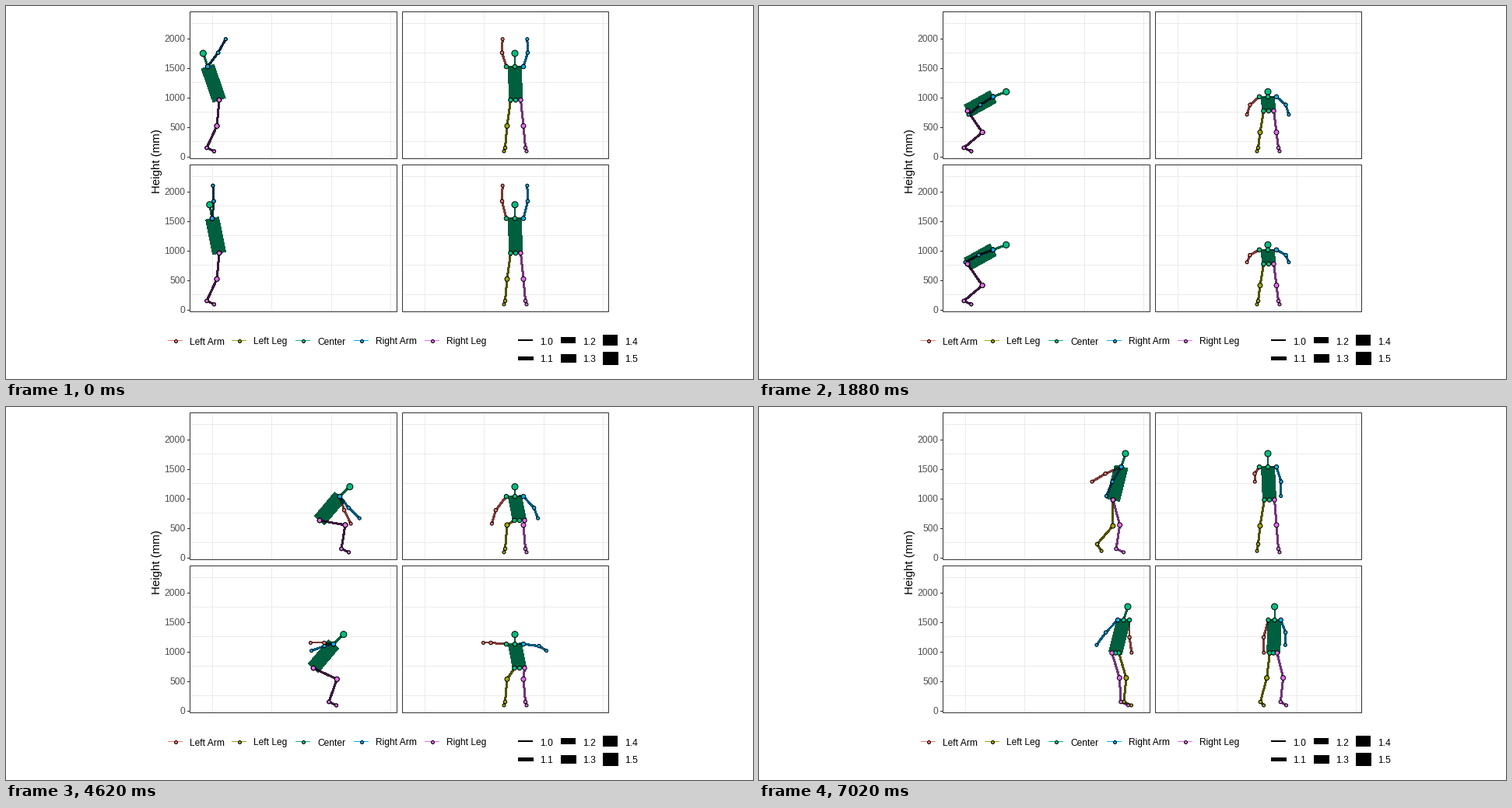
Animation, 960 px wide and 480 px high, one loop 7.04 s. Source, as a matplotlib script:

```python
import numpy as np
import matplotlib.pyplot as plt
from matplotlib.animation import FuncAnimation
from matplotlib.collections import LineCollection
from matplotlib.patches import Rectangle

W, H, STEP, FRAMES = 960, 480, 20, 352
PT = 0.72  # points per pixel at 100 dpi
RED, OLIVE, GREEN, BLUE, PINK = "#F8766D", "#A3A500", "#00BF7D", "#00B0F6", "#E76BF3"
THIGH, SHANK, FOOT, GROUND = 33.5, 31, 10.5, 182.5

plt.rcParams["font.family"] = "Liberation Sans"

# Motion clock: pauses on landing, then runs on
now = np.arange(FRAMES) * STEP
LAND, PAUSE = 3620, 660
clock = np.where(now < LAND, now, np.maximum(now - PAUSE, LAND))


def curve(t, *keys):
    """Monotone cubic through (time, value) keys, flat outside them."""
    ts, vs = np.array(keys, float).T
    h, d = np.diff(ts), np.diff(vs) / np.diff(ts)
    m = np.zeros_like(vs)
    same = d[:-1] * d[1:] > 0
    m[1:-1] = np.where(same, 2 * d[:-1] * d[1:] / np.where(same, d[:-1] + d[1:], 1), 0)
    t = np.clip(t, ts[0], ts[-1])
    i = np.clip(np.searchsorted(ts, t, "right") - 1, 0, len(h) - 1)
    u = (t - ts[i]) / h[i]
    return (vs[i] * (1 + 2 * u) * (1 - u) ** 2 + vs[i + 1] * u * u * (3 - 2 * u)
            + h[i] * u * (1 - u) * (m[i] * (1 - u) - m[i + 1] * u))


def polar(r, deg):
    a = np.radians(deg)
    return r * np.cos(a), r * np.sin(a)


def bend_knee(hx, hy, ax_, ay):
    """Place the knee in front of the line from hip to ankle."""
    dx, dy = ax_ - hx, ay - hy
    d = np.hypot(dx, dy)
    along = (THIGH**2 - SHANK**2 + d * d) / (2 * d)
    out = np.sqrt(np.maximum(THIGH**2 - along**2, 0))
    return hx + (along * dx + out * dy) / d, hy + (along * dy - out * dx) / d


def jumper(drop, stop, pace, sway, arms, twist, wide, low, land, steps, turn):
    """Side and front joint paths of one athlete doing a standing long jump.

    Joints: head, shoulder/elbow/wrist left then right,
    hip/knee/ankle/toe left then right, neck, pelvis.
    """
    t = np.minimum(clock, stop)
    rise = np.where(t < 4340, t, 4340 + pace * (t - 4340))

    hip_x = curve(t, (0, 274), (680, 274 - 16.5 * sway), (1450, 259), (1880, 268),
                  (2180, 291), (2560, 323), (2800, 351), (LAND, 397),
                  (3960, 403 + (land - 431) / 2), (4740, 418), (5280, 441), (5760, 455),
                  (6360, 458))
    hip_y = curve(rise, (0, 121), (680, 120), (1880, 135), (2180, 127), (2800, 100),
                  (LAND, low), (3960, low), (4740, 143), (5280, 121.5), (5760, 119.5))
    lean = curve(rise, (0, -19 * sway), (680, 22 * sway), (1880, 61), (2560, 16),
                 (2800, -2), (LAND, 12), (3960, 40), (4740, 42), (5280, 31), (5760, 14))
    dx, dy = polar(45.5 - 0.13 * np.maximum(lean, 0), lean - 90)
    neck_x, neck_y = hip_x + dx, hip_y + dy
    dx, dy = polar(18, 1.1 * lean - 88)
    head_x, head_y = neck_x + dx, neck_y + dy

    arm_times = [0, 680, 1450, 1880, 2180, 2560, 2800, 3250, LAND, 3960, 5280, stop]
    arm = curve(t, *zip(arm_times, arms))
    cross = curve(t, (LAND, 0), (3960, 10), (5280, twist[0]), (stop, twist[1]))
    out = curve(t, (0, 5.5), (680, 9), (1880, 12), (2800, 1), (LAND, wide),
                (3960, 0.8 * wide), (5280, 8), (5760, 6))
    out2 = 0.7 * out - 4.5
    upper = np.sqrt(np.maximum(23**2 - out**2, 12**2))
    fore = np.sqrt(20**2 - out2**2)

    yaw = np.radians(curve(t, (5280, 0), (6360, turn)))
    shift = curve(t, (4340, 0), (5280, turn / 8), (6360, turn / 5))
    hip_mid = 655 + 0.6 * shift + curve(t, (1880, 0), (3960, 5), (5280, 1))
    neck_mid = 654 + shift

    foot_x = curve(t, (0, 258), (680, 262), (2250, 264), (2560, 281), (2800, 306),
                   (3250, 370), (LAND, land))
    lift = curve(t, (2250, 0), (2560, 21), (2800, 44), (3250, 32), (LAND, 0))

    limbs, legs = [], []
    for sign, (start, end, reach, height) in zip((-1, 1), steps):
        sx, sf = neck_x - sign * 11 * np.sin(yaw), neck_mid + sign * 11 * np.cos(yaw)
        ex, ey = polar(upper, arm - sign * cross)
        wx, wy = polar(fore, arm - sign * cross - 8)
        limbs += [(sx, sf, neck_y), (sx + ex, sf + sign * out, neck_y + ey),
                  (sx + ex + wx, sf + sign * (out + out2), neck_y + ey + wy)]

        u = np.clip((t - start) / (end - start), 0, 1)
        up = lift + height * np.sin(np.pi * u)
        hx, hf = hip_x - sign * 6.5 * np.sin(yaw), hip_mid + sign * 6.5 * np.cos(yaw)
        fx, fy = foot_x + reach * u * u * (3 - 2 * u), GROUND - up
        kx, ky = bend_knee(hx, hip_y, fx, fy)
        tx, ty = polar(FOOT, 25 + 85 * np.tanh(up / 15))
        legs += [(hx, hf, hip_y), (kx, 654.5 + shift + sign * 10.5, ky),
                 (fx, 654.5 + shift / 3 + sign * 13, fy),
                 (fx + tx, 654.5 + shift + sign * 14.5, fy + ty)]

    joints = [(head_x, neck_mid, head_y), *limbs, *legs,
              (neck_x, neck_mid, neck_y), (hip_x, hip_mid, hip_y)]
    side, front, y = np.array(joints).transpose(1, 2, 0)
    y = y + drop
    return [np.stack([side, y], -1), np.stack([front, y], -1)]


views = jumper(
    drop=0, stop=5760, pace=1, sway=1, twist=(5, 18), wide=17, low=146, land=431,
    arms=[-53, 17, 150, 148, 78, -58, -24, 27, 39, 62, 153, 139],
    steps=[(5580, 6340, 25, 9), (4640, 5760, 28, 4)], turn=0)
views += jumper(
    drop=197, stop=6360, pace=0.7, sway=0.6, twist=(26, -22), wide=25, low=139, land=415,
    arms=[-85, -28, 145, 160, 80, -60, -60, 24, 150, 178, 138, 112],
    steps=[(4840, 5840, 54, 9), (4440, 5240, 50, 5)], turn=43)

# (joint, joint, colour, width), back to front
BONES = [(1, 2, RED, 2), (2, 3, RED, 2)]
BONES += [(i, i + 1, OLIVE, 2) for i in (7, 8, 9)]
BONES += [(15, 16, GREEN, 17), (0, 15, GREEN, 2), (1, 4, GREEN, 2), (7, 11, GREEN, 2)]
BONES += [(4, 5, BLUE, 2), (5, 6, BLUE, 2)]
BONES += [(i, i + 1, PINK, 2) for i in (11, 12, 13)]
ENDS = np.array([b[:2] for b in BONES])

# (joint, colour, diameter), back to front
DOTS = [(2, RED, 4.5), (3, RED, 4), (8, OLIVE, 6), (9, OLIVE, 4.5), (10, OLIVE, 4),
        (0, GREEN, 8)] + [(i, GREEN, 5.5) for i in (1, 7, 15, 16)]
DOTS += [(4, BLUE, 5.5), (5, BLUE, 4.5), (6, BLUE, 4),
         (11, PINK, 5.5), (12, PINK, 6), (13, PINK, 4.5), (14, PINK, 4)]
SPOTS = [d[0] for d in DOTS]

fig = plt.figure(figsize=(W / 100, H / 100), dpi=100, facecolor="white")
ax = fig.add_axes([0, 0, 1, 1])
ax.set_xlim(0, W)
ax.set_ylim(H, 0)
ax.axis("off")


def line(xs, ys, color, width=1):
    ax.plot(xs, ys, color=color, lw=width * PT, solid_capstyle="butt",
            antialiased=False, zorder=1)


def label(x, y, s, px=12, color="black", **kw):
    ax.text(x, y, s, fontsize=px * PT, color=color, **kw)


for top in (8, 205):
    for left, right, x0 in ((237, 502, 265), (510, 774, 538)):
        for k in range(4):
            line([x0 + round(76.4 * k)] * 2, [top, top + 188], "#EBEBEB")
        for k in range(5):
            line([left, right], [top + 14 + 38 * k] * 2, "#EBEBEB")
        ax.add_patch(Rectangle((left - 1, top - 1), right - left + 1, 189, fill=False,
                               ec="#333333", lw=PT, zorder=6))
    for k in range(5):
        y = top + 186 - 38 * k
        line([233, 236], [y, y], "#333333")
        label(230.5, y + 4, str(500 * k), color="#4D4D4D", ha="right")

label(194, 199.5, "Height (mm)", 15, rotation=90, ha="center", va="center")

LEGEND = [(208, "Left Arm", RED), (290, "Left Leg", OLIVE), (372, "Center", GREEN),
          (447, "Right Arm", BLUE), (538, "Right Leg", PINK)]
for x, name, c in LEGEND:
    line([x, x + 18], [430, 430], c)
    ax.scatter([x + 9.5], [430.5], s=(4 * PT) ** 2, c=c, ec="black", lw=PT, zorder=3)
    label(x + 28, 435.5, name)

for k in range(6):
    x, y = (658, 713, 767)[k // 2], 430 + 23 * (k % 2)
    line([x, x + 19], [y, y], "black", 2 + 3 * k)
    label(x + 28.5, y + 5.5, f"{1 + k / 10:.1f}")


def bone_layer(colors, **kw):
    layer = LineCollection([], colors=colors, linewidths=[b[3] * PT for b in BONES] * 4,
                           antialiaseds=False, capstyle="butt", **kw)
    ax.add_collection(layer, autolim=False)
    return layer


# Coloured limbs under a half-transparent black copy
layers = [bone_layer([b[2] for b in BONES] * 4, zorder=4),
          bone_layer("black", alpha=0.5, zorder=4.5)]
count = 4 * len(DOTS)
dots = ax.scatter(np.zeros(count), np.zeros(count),
                  s=[(d[2] * PT) ** 2 for d in DOTS] * 4,
                  c=[d[1] for d in DOTS] * 4, ec="black", lw=PT, zorder=5)


def draw(i):
    joints = [v[i] for v in views]
    for layer in layers:
        layer.set_segments(np.concatenate([j[ENDS] for j in joints]))
    dots.set_offsets(np.concatenate([j[SPOTS] for j in joints]))
    return *layers, dots


anim = FuncAnimation(fig, draw, frames=FRAMES, interval=STEP, repeat=True,
                     repeat_delay=0, blit=False)
plt.show()
```
